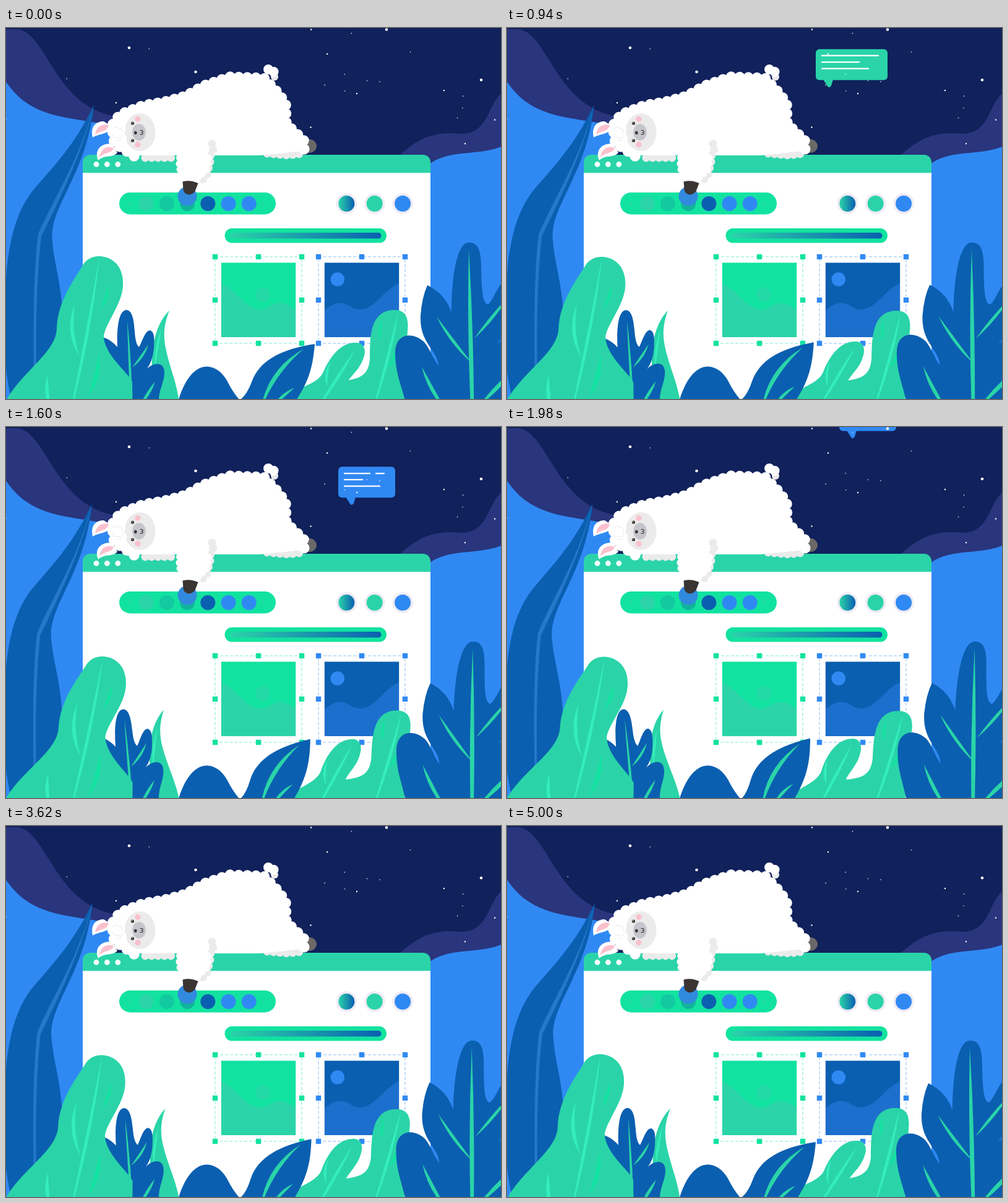
These frames come from a looping animation (800x600 px, 5.02 s). An HTML page:

```html
<!DOCTYPE html>
<html lang="en">
<head>
<meta charset="utf-8">
<title>Resting llama</title>
<style>
  html, body { margin: 0; height: 100%; overflow: hidden; background: #10215b; }
  svg { display: block; width: 100vw; height: 100vh; }
</style>
</head>
<body>
<svg id="stage" viewBox="0 0 800 600"></svg>
<script>
const LOOP = 5020;
const RISE = .283; // bubble speed, px per ms
const NIGHT = '#10215b', PURPLE = '#29357c';
const GREEN = '#2ad4a8', BRIGHT = '#12e2a0', MINT = '#34edbc';
const BLUE = '#3089f3', DEEP = '#0b5fb0', MID = '#1c6fcc';
const WHITE = '#fff', SHADE = '#ebebeb', DARK = '#3a3533', PINK = '#fbc0cd';

const path = (fill, d) => `<path fill="${fill}" d="${d}"/>`;
const line = (stroke, width, d) =>
  `<path fill="none" stroke="${stroke}" stroke-width="${width}" stroke-linecap="round" d="${d}"/>`;
const dot = (fill, x, y, r, ry = r) => `<ellipse fill="${fill}" cx="${x}" cy="${y}" rx="${r}" ry="${ry}"/>`;
const box = (fill, x, y, w, h, r = 0) =>
  `<rect fill="${fill}" x="${x}" y="${y}" width="${w}" height="${h}" rx="${r}"/>`;
const row = (colors, x, step, y, r) => colors.map((c, i) => dot(c, x + step * i, y, r)).join('');

// A filled shape whose outline is a row of round tufts
const wool = (color, r, d, close = '') => path(color, d + close) +
  `<path fill="none" stroke="${color}" stroke-width="${2 * r}" stroke-linecap="round" stroke-dasharray="0 ${1.6 * r}" d="${d}"/>`;

// A thin lens between two points, bent sideways
function vein(color, x1, y1, x2, y2, bend, width) {
  const dx = x2 - x1, dy = y2 - y1, length = Math.hypot(dx, dy);
  const control = b => `${(x1 + x2) / 2 - 2 * b * dy / length} ${(y1 + y2) / 2 + 2 * b * dx / length}`;
  return path(color, `M${x1} ${y1}Q${control(bend)} ${x2} ${y2}Q${control(bend + width)} ${x1} ${y1}Z`);
}

let seed = 7;
const random = () => (seed = seed * 16807 % 2147483647) / 2147483647;
const star = (x, y, r) => dot(WHITE, x, y, r);
const faintStars = Array.from({ length: 15 }, () => star(800 * random(), 160 * random(), .8));
const midStars = [[178, 121], [493, 2.5], [519, 42], [567, 106], [708, 101], [492.5, 160.5], [790, 148.5], [742, 187]];
const bigStars = [[199, 32], [306.5, 71], [615, 2.5], [768, 84]];
const stars = faintStars.join('')
  + midStars.map(p => star(...p, 1.2)).join('')
  + bigStars.map(p => star(...p, 2.3)).join('');

const sky = box(NIGHT, 0, 0, 800, 600)
  + path(PURPLE, 'M0 2H20C66 10 78 122 172 142L200 165H0Z')
  + path(BLUE, 'M0 87C40 146 95 143 170 157L200 600H0Z')
  + path(PURPLE, 'M630 212C662 180 690 166 735 171C780 171 778 125 800 106V230H630Z')
  + path(BLUE, 'M680 223C715 195 760 208 800 192V600H680Z');

// Each bubble passes height y at time t
const bubbles = [
  { x: 499, y: 34.5, t: 940, w: 116, fill: GREEN, text: 'M10 10.5h91M10 21h60M10 31.5h75' },
  { x: 537, y: 155, t: 1280, w: 92, fill: BLUE, text: 'M10 11h41M61 11h13M10 21h29M10 31.5h57' }
];
const bubble = b => `<g class="bubble">${box(b.fill, 0, 0, b.w, 50, 6)}
  ${path(b.fill, 'M12 49h16l-3 10q-3 5-6 1Z')}${line(WHITE, 2.3, b.text)}</g>`;

function picture(x, tint, back, hill, flip) {
  let handles = '';
  for (let i = 0; i < 9; i++)
    if (i !== 4) handles += box(tint, x + 70 * (i % 3) - 4.2, 365.8 + 70 * Math.floor(i / 3), 8.4, 8.4);
  const hills = 'M10 86C18 80 27 73 39 75C52 77 57 89 75 84C97 76 106 54 130 43V130H10Z';
  return `<rect x="${x}" y="370" width="140" height="140" fill="none" stroke="${tint}" stroke-opacity=".55" stroke-dasharray="5 3"/>`
    + handles + box(back, x + 9.8, 379.6, 120.4, 120.4)
    + `<g transform="translate(${flip ? x + 140 : x} 370)${flip ? 'scale(-1 1)' : ''}">${path(hill, hills)}</g>`;
}

const panel = box(GREEN, 124, 205, 562, 60, 12) + box(WHITE, 124, 234.3, 562, 366)
  + row([WHITE, WHITE, WHITE], 146, 17.4, 220.5, 4.4)
  + box(BRIGHT, 183, 266, 253, 35.4, 17.7)
  + path('#20d9a3', 'M197 284l6-5v10ZM420 284l-6-5v10Z')
  + row([GREEN, '#13c9a0', '#11b49b', DEEP, BLUE, BLUE], 226.7, 33.2, 284, 12)
  + row(Array(3).fill('#efebf5'), 550.3, 45.4, 284, 16.7)
  + row(['url(#blend)', GREEN, BLUE], 550.3, 45.4, 284, 13)
  + box(BRIGHT, 353.5, 324, 261.5, 23.6, 11.8) + box('url(#blend)', 362, 331, 244.5, 9.6, 4.8)
  + picture(338, BRIGHT, BRIGHT, GREEN, true) + dot('#22d9a5', 415, 431, 12)
  + picture(505, BLUE, DEEP, MID) + dot(BLUE, 535.8, 406.5, 11.2);

const ears = path(WHITE, 'M140 177C136 158 146 151 158 151L172 160C164 173 152 170 140 177ZM149 214C143 200 150 186 172 187L180 202C170 211 161 204 149 214Z')
  + path(PINK, 'M144 173C145 160 155 154 166 157C163 169 153 165 144 173ZM151 209C152 196 163 189 174 194C171 204 159 200 151 209Z');

const eye = y => dot(DARK, 204.5, y, 2.6) + dot(WHITE, 203.8, y - .8, .8);
const face = dot(SHADE, 216.5, 168.5, 25, 30.5)
  + wool(WHITE, 9, 'M187 150L184 163 188 190')
  + line('#e9e9ec', 1, 'M173 163q4-5 9-1q7 0 6 7M172 172q2 7 9 5q7 3 8-4M179 181q5 3 8-1')
  + dot('#c6c5cc', 215, 168.5, 11, 13.5) + dot(DARK, 209.3, 169.5, 2.3, 2.8)
  + line(DARK, 1.1, 'M217 165.8c5-1 6 3 1.5 3.3c5 .3 3 4-1.5 2.8')
  + eye(154) + eye(182)
  + dot(PINK, 213, 147.3, 4.6) + dot(PINK, 213, 188.7, 4.6);

const body = dot('#6b6868', 490, 191, 12, 11) + dot(SHADE, 434, 79, 6)
  + wool(SHADE, 6.5, 'M225 210H276') + wool(SHADE, 6.5, 'M422 203L456 206 480 203')
  + wool(WHITE, 8, 'M424 67L433 67 432 75')
  + wool(WHITE, 8.7, 'M207 207L175 186 171 158 184 140 222 125 258 119 290 110 320 93 361 79 417 81 441 106 452 122 453 155 481 181 482 199',
    'L410 206H207Z');

const arm = wool(SHADE, 6.5, 'M333 187L336 194 331 204 330 216 325 237 314 250')
  + wool(WHITE, 6, 'M281 210L280 226 290 244 307 245 325 228 327 208', 'L325 186 278 198Z')
  + dot('#318ade', 293, 272, 15.5)
  + path(DARK, 'M285.5 248.5Q298 245 310.5 251L305.5 264Q300 271 293 269Q287 267 286.5 261Z');

const llama = body + ears + face + arm;

// Leaves lean by "turn" degrees around their root
const leaves = [
  { root: [45, 600], turn: -.5, fill: DEEP,
    shape: 'M142 125C130 240 68 290 75 345C78 390 100 440 88 520V640H18C5 590 0 560-2 530C-4 400 0 310 50 255C90 210 115 180 142 125Z',
    detail: path('#2679ca', 'M142 125C120 210 80 270 52 333C45 390 44 470 45 560H49C48 470 50 400 57 337C85 280 125 200 142 125Z') },
  { root: [262, 600], turn: -4.8, fill: GREEN,
    shape: 'M264 457C240 480 234 520 236 560V640H283C281 590 272 570 265 545C255 510 251 490 264 457Z',
    detail: vein(MINT, 251, 488, 241, 550, 0, 4) },
  { root: [205, 600], turn: -2.8, fill: DEEP,
    shape: 'M195 456C206 457 207 480 208 490Q209 511 215 516C221 505 225 489 233 489C242 492 239 510 239 518Q237 540 227 552C236 542 256 537 256 558C255 575 249 580 247 600V640H170V580L150 498Q168 502 180 516C179 490 181 456 195 456Z',
    detail: vein(GREEN, 196, 473, 204, 660, -3, 4) + vein(GREEN, 230, 512, 204, 549, -4, 4)
      + vein(GREEN, 241, 572, 216, 612, -3, 5) },
  { root: [78, 600], turn: 2, fill: GREEN,
    shape: 'M-20 640L-2 606C25 555 82 525 82 485C84 440 112 405 125 382C138 364 162 367 175 378C190 390 192 415 186 433C180 455 158 485 158 500C160 530 200 560 204 572L205 640Z',
    detail: vein(MINT, 151, 369, 100, 640, -6, 5) + vein(MINT, 111, 447, 119, 532, 5, 6)
      + vein(MINT, 67, 561, 72, 620, 0, 6) + vein(BRIGHT, 166, 415, 153, 455, -5, 5)
      + vein(BRIGHT, 150, 527, 133, 596, -8, 7) },
  { root: [319, 600], turn: 0, fill: DEEP, shape: 'M278 604C300 530 340 540 357 570Q368 592 380 604Z', detail: '' },
  { root: [505, 610], turn: -5.5, fill: GREEN,
    shape: 'M565 509C578 508 583 520 578 533C573 550 560 560 552 572V640H450L460 592C475 580 505 575 513 556C522 535 540 508 565 509Z',
    detail: vein(MINT, 566, 518, 500, 620, -3, 5) + vein(MINT, 524, 540, 519, 580, 1, 4) },
  { root: [400, 620], turn: -5, fill: DEEP,
    shape: 'M499 511C440 520 410 540 398 570Q389 595 377 602V650H430C485 590 495 560 499 511Z',
    detail: vein(GREEN, 481, 519, 411, 620, 8, 7) + vein(GREEN, 466, 582, 430, 615, 0, 5) },
  { root: [558, 600], turn: 2.8, fill: GREEN,
    shape: 'M628 456C648 456 651 472 649 490C647 530 640 570 646 640H520L545 571C575 567 586 560 588 535C588 500 588 456 628 456Z',
    detail: vein(MINT, 634, 459, 592, 620, -5, 5) + vein(BRIGHT, 607, 470, 605, 505, -1, 4)
      + vein(BRIGHT, 632, 517, 617, 549, -5, 5) },
  { root: [754, 600], turn: 2, fill: DEEP,
    shape: 'M748 347C764 346 768 362 768 390C769 425 770 445 779 447C790 438 795 410 815 400V640H650C648 590 629 570 629 525C629 495 655 490 675 507C685 518 690 535 699 546C697 520 668 510 670 465Q672 436 681 416Q710 430 720 460C720 410 727 347 748 347Z',
    detail: path(MID, 'M793 510L810 488V505Z')
      + vein(GREEN, 748, 358, 756, 700, -3, 7) + vein(GREEN, 696, 467, 753, 542, 0, 5)
      + vein(GREEN, 812, 435, 757, 502, -3, 5) + vein(GREEN, 672, 548, 712, 620, 0, 6)
      + vein(GREEN, 830, 545, 764, 612, -3, 7) }
];
const leaf = l => `<g class="leaf">${path(l.fill, l.shape)}${l.detail}</g>`;

const stage = document.getElementById('stage');
stage.innerHTML = `<defs><linearGradient id="blend"><stop stop-color="${GREEN}"/><stop offset="1" stop-color="${DEEP}"/></linearGradient></defs>`
  + sky + bubbles.map(bubble).join('') + stars + panel + llama + leaves.map(leaf).join('');
const leafNodes = stage.querySelectorAll('.leaf');
const bubbleNodes = stage.querySelectorAll('.bubble');

function draw(t) {
  const sway = (1 - Math.cos(2 * Math.PI * (t + 50) / LOOP)) / 2;
  leaves.forEach((l, i) =>
    leafNodes[i].setAttribute('transform', `rotate(${l.turn * sway} ${l.root})`));
  bubbles.forEach((b, i) =>
    bubbleNodes[i].setAttribute('transform', `translate(${b.x} ${Math.min(300, b.y + RISE * (b.t - t))})`));
}

const start = performance.now();
function tick() {
  draw((performance.now() - start) % LOOP);
  requestAnimationFrame(tick);
}
tick();
</script>
</body>
</html>
```
